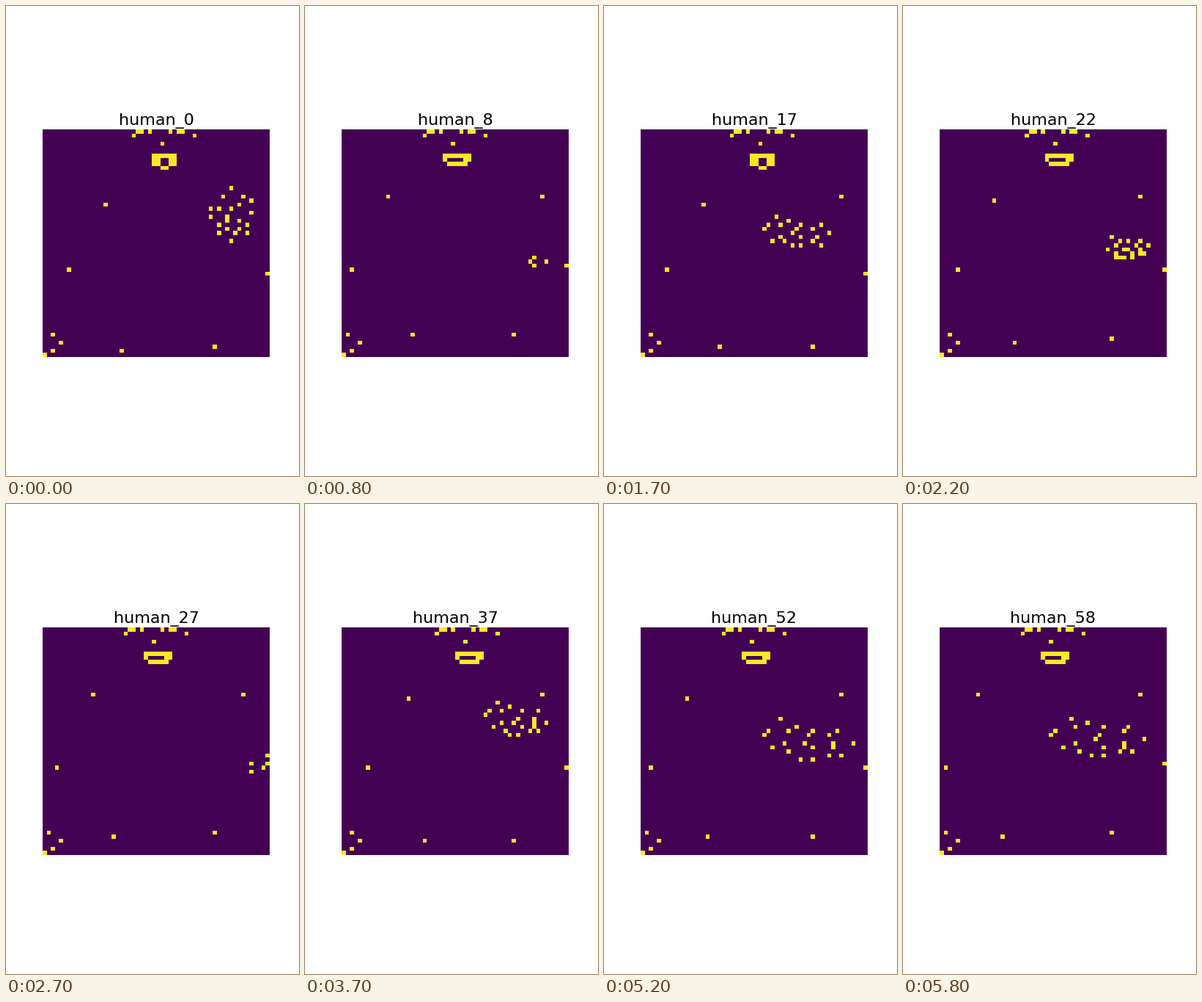
These frames come from a looping animation (400 by 640 pixels, 5.9 s). A matplotlib script:

```python
import numpy as np
import matplotlib.pyplot as plt
from matplotlib.animation import FuncAnimation
from matplotlib.colors import ListedColormap

plt.rcParams["text.hinting"] = "force_autohint"
plt.rcParams["text.hinting_factor"] = 8

SIZE, FRAMES = 56, 59

# Key poses: time, sway, dip, wrist x, wrist y, reach x, reach y, palm half-width
POSES = np.array([
    (0, 2.0, 1.00, 46, 27, 0, -12, 5.5),
    (8, 0.0, 0.00, 50, 32, -4, -0.5, 1),
    (17, 2.0, 0.82, 46, 25, -16, 0, 4),
    (27, 0.3, 0.20, 55, 31, -4, 3.5, 1.5),
    (37, 2.5, 0.53, 50, 23, -15, -1, 4),
    (46, 0.6, 0.40, 53, 29, -21, -2, 4.5),
    (58, -0.73, 0.10, 50, 27, -23, 0, 5),
])
FINGERS = (0.6, 0.9, 1.0, 0.95, 0.8)  # lengths, thumb first
JITTER = np.random.default_rng(4).uniform(-0.8, 0.8, (5, 4, 2))


def pose_at(i):
    """Eased blend of the two key poses around step i."""
    at = np.interp(i, POSES[:, 0], np.arange(len(POSES)))
    k = min(int(at), len(POSES) - 2)
    t = at - k
    t = t * t * (3 - 2 * t)
    return POSES[k, 1:] * (1 - t) + POSES[k + 1, 1:] * t


def cell(value):
    return int(np.floor(value + 0.5))


def face(sway):
    nose = cell(27.2 + 0.95 * sway)
    yield nose, 3
    for dx in (-6, -5, -3, 2, 4, 5):  # eyes
        yield nose + dx, 0
    for dx in (-7, 8):  # ears
        yield nose + dx, 1


def mouth(sway, dip):
    """Ring of lips that opens by one row when the head dips."""
    gap = int(dip > 0.7)
    nose = cell(27.2 + 0.95 * sway)
    left, right = nose - 2, nose + 4 - gap
    for x in range(left, right + 1):
        yield x, 6
    for y in range(7, 8 + gap):
        for x in (left, left + gap, right - 1, right):
            yield x, y + 0
            if gap:
                yield x, y + gap * (y < 8)
    for x in range(left + 1 + gap, right - gap):
        yield x, 8 + gap


def body(sway, dip):
    yield 11 + 2.1 * sway, 16.1 + 1.9 * dip  # shoulders
    yield 49, 16
    yield 2 + 1.75 * sway, 34  # elbows
    yield 55, 33 + 2 * dip
    yield 16.5 + 1.4 * sway, 50.3 + 3.5 * dip  # hips
    yield 42, 49.7 + 3.5 * dip
    yield 1.2 + 0.4 * sway, 50  # resting hand
    yield 4, 52
    yield 2, 54
    yield 0, 55


def hand(wrist, reach, width):
    """Fan of finger joints; a lowered hand keeps only wrist and three tips."""
    length = np.hypot(*reach)
    side = np.array([-reach[1], reach[0]]) / length
    raised = length > 8
    yield wrist
    for k, size in enumerate(FINGERS):
        for j in range(1, 5):
            if raised or (j == 4 and k % 2 == 0):
                fan = width * (k - 2) / 2 * (0.5 + j / 8)
                yield wrist + reach * size * j / 4 + side * fan + raised * JITTER[k, j - 1]


def grid(i):
    sway, dip, wx, wy, rx, ry, width = pose_at(i)
    g = np.zeros((SIZE, SIZE))
    parts = (face(sway), mouth(sway, dip), body(sway, dip),
             hand(np.array([wx, wy]), np.array([rx, ry]), width))
    for part in parts:
        for x, y in part:
            col, row = cell(x), cell(y)
            if 0 <= col < SIZE and 0 <= row < SIZE:
                g[row, col] = 1
    return g


fig, ax = plt.subplots(figsize=(5, 8), dpi=80, facecolor="white")
fig.subplots_adjust(left=0.125, right=0.9, bottom=0.11, top=0.88)
ax.axis("off")
image = ax.imshow(grid(0), cmap=ListedColormap(["#440154", "#fde725"]),
                  vmin=0, vmax=1, interpolation="nearest")
title = ax.set_title("human_0", fontsize=20, fontfamily="DejaVu Sans")


def draw(i):
    image.set_data(grid(i))
    title.set_text(f"human_{i}")
    return image, title


anim = FuncAnimation(fig, draw, frames=FRAMES, interval=100, repeat=True, repeat_delay=0)
plt.show()
```
